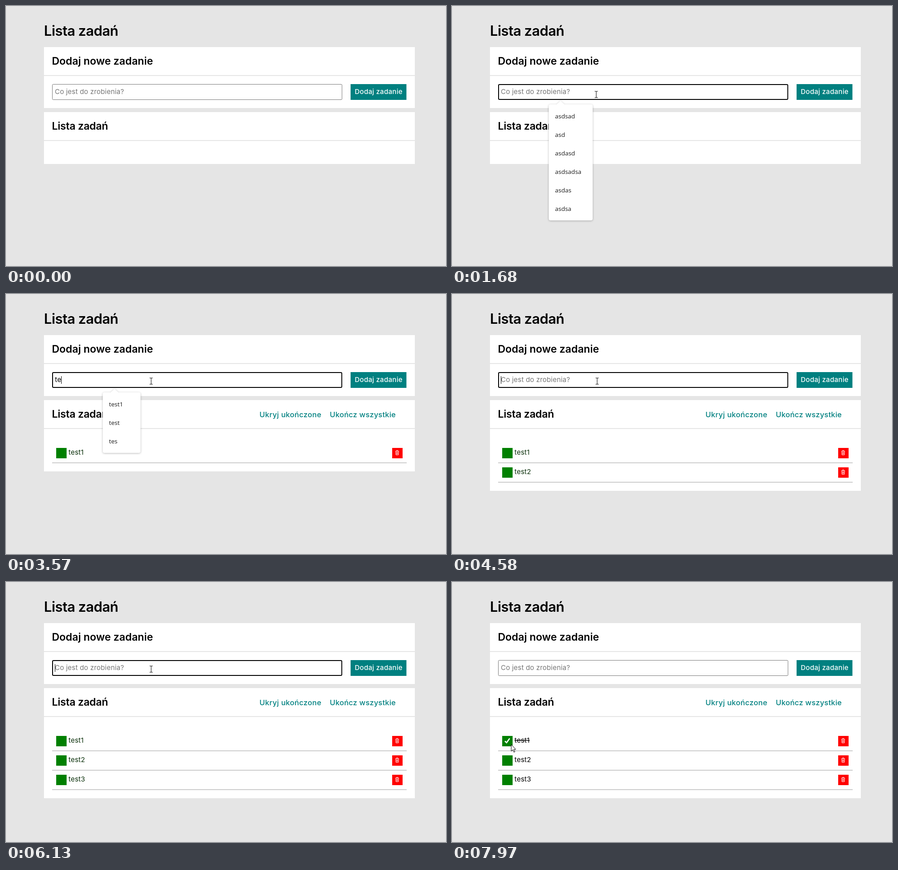
Recreate the animation shown at these times as an HTML page. Size 973 by 576 pixels, loop 8 s.

```html
<!DOCTYPE html>
<html lang="pl">
<head>
<meta charset="utf-8">
<title>Lista zadań</title>
<style>
  html, body { margin: 0; width: 100%; height: 100%; overflow: hidden; background: #e5e5e5; }
  svg { display: block; width: 100%; height: 100%; font: 15px Inter, sans-serif; letter-spacing: .2px; }
  .title { font-size: 30.8px; font-weight: 600; letter-spacing: -.5px; }
  .heading { font-size: 23px; font-weight: 600; letter-spacing: 0; }
  .heading.list { letter-spacing: -.25px; }
  .card { fill: #fff; }
  .rule { fill: #e5e5e5; }
  .mid { text-anchor: middle; font-weight: 500; }
  .button { fill: #fff; letter-spacing: .3px; }
  .link { fill: #008080; font-size: 16.5px; letter-spacing: .3px; }
  .hint { fill: #757575; }
  .popup { filter: drop-shadow(0 1px 2px #0004); }
  .popup text { font: 13.5px "Open Sans", sans-serif; letter-spacing: 0; fill: #1b1b1b; }
  .task text { fill: #0a300a; }
  .settled .task text { fill: #000; }
  .done text { text-decoration: line-through; }
  .check { display: none; fill: none; stroke: #fff; stroke-width: 2.6; }
  .done .check { display: inline; }
</style>
</head>
<body>
<svg viewBox="0 0 973 576">
  <text class="title" x="84" y="66">Lista zadań</text>

  <rect class="card" x="84" y="91" width="820" height="135"/>
  <rect class="rule" x="84" y="153" width="820" height="2"/>
  <text class="heading" x="101.5" y="130">Dodaj nowe zadanie</text>
  <rect id="field" fill="#fff"/>
  <text id="hint" class="hint" x="108" y="195">Co jest do zrobienia?</text>
  <text id="typed" x="108.3" y="195"></text>
  <rect id="caret" y="182" width="1" height="17"/>
  <rect x="762" y="173" width="123.5" height="35" fill="#008080"/>
  <text class="mid button" x="824" y="195">Dodaj zadanie</text>

  <rect id="listCard" class="card" x="84" y="235" width="820"/>
  <rect class="rule" x="84" y="297" width="820" height="2"/>
  <text class="heading list" x="101.5" y="274">Lista zadań</text>
  <g id="links">
    <text class="mid link" x="629" y="273">Ukryj ukończone</text>
    <text class="mid link" x="789" y="273" style="letter-spacing:.2px">Ukończ wszystkie</text>
  </g>
  <g id="tasks"></g>

  <g id="popup" class="popup">
    <path d="M231 218.5 L240 210 L249 218.5Z" fill="#fff"/>
    <rect id="popupBox" x="214" y="218" rx="4" fill="#fff"/>
    <g id="options"></g>
  </g>

  <g id="arrow">
    <path d="M.5 .5 V15.4 L3.9 12.2 L6.4 17.6 L8.6 16.6 L6.2 11.4 H10.6Z" fill="#fff" stroke="#000" stroke-linejoin="round"/>
  </g>
  <g id="beam" fill="none">
    <path id="beamShape" d="M-3.5 -7 H-1 L0 -6 L1 -7 H3.5 M-3.5 7 H-1 L0 6 L1 7 H3.5 M0 -6 V6" stroke="#111" stroke-width="1.1"/>
  </g>
</svg>

<script>
const LOOP = 8000, STEP = 70, ROW = 43, OPTION = 41;
const $ = id => document.getElementById(id);

const history = ['asdsad', 'asd', 'asdasd', 'asdsadsa', 'asdas', 'asdsa'];
const early = ['test', 'test1', 'tes'];
const recent = ['test1', 'test', 'tes'];
const others = ['trening', 'tablica'];

// Each entry changes part of the state from its time on.
const events = [
  [0, { text: '', caret: false, focus: false, options: [], fade: 1, tasks: 0, done: false, settled: false }],
  [1140, { focus: true, caret: true, options: history }],
  [1680, { caret: false }],
  [1750, { text: 't', caret: true }],
  [1820, { options: [...early, ...others] }],
  [1960, { text: 'te', options: early }],
  [2110, { text: 'tes' }],
  [2290, { text: 'test' }],
  [2360, { options: early.slice(0, 2) }],
  [2500, { text: 'test1' }],
  [2550, { fade: .45 }],
  [2620, { options: [] }],
  [2890, { text: '', tasks: 1 }],
  [3050, { caret: false }],
  [3430, { text: 't', caret: true }],
  [3500, { options: [...recent, ...others], fade: 1 }],
  [3570, { text: 'te', options: recent }],
  [3840, { text: 'tes' }],
  [4040, { text: 'test', options: recent.slice(0, 2) }],
  [4240, { text: 'test2' }],
  [4310, { fade: .45 }],
  [4380, { options: [] }],
  [4580, { text: '', tasks: 2 }],
  [4810, { caret: false }],
  [5050, { text: 't', caret: true }],
  [5120, { options: recent, fade: 1 }],
  [5190, { text: 'te' }],
  [5390, { text: 'tes' }],
  [5590, { text: 'test', options: recent.slice(0, 2) }],
  [5920, { text: 'test3' }],
  [5990, { fade: .45 }],
  [6060, { options: [] }],
  [6130, { text: '', tasks: 3 }],
  [6460, { caret: false }],
  [6990, { caret: true }],
  [7520, { caret: false }],
  [7830, { focus: false, settled: true }],
  [7900, { done: true }]
];

// Pointer stops: time, x, y.
const stops = [
  [380, 865, 532], [1140, 303, 203], [1210, 322, 192], [1280, 319, 196],
  [1750, 319, 196], [1820, 321, 193], [6720, 321, 193], [7200, 209.5, 279],
  [7550, 124, 361], [7620, 128, 360], [7690, 130.5, 359.5], [LOOP, 130.5, 359.5]
];

function pointerAt(time) {
  const t = 380 + Math.floor((time - 380) / STEP + .15) * STEP;
  const next = stops.findIndex(stop => stop[0] > t);
  const [t0, x0, y0] = stops[next - 1], [t1, x1, y1] = stops[next];
  let k = (t - t0) / (t1 - t0);
  if (t1 === 1140) k = k * k * (3 - 2 * k);
  return [x0 + (x1 - x0) * k, y0 + (y1 - y0) * k];
}

$('tasks').innerHTML = [1, 2, 3].map((n, i) => `
  <g class="task" transform="translate(0 ${i * ROW})">
    <rect x="111" y="341" width="23" height="23" fill="#008000"/>
    <path class="check" d="M117 352.5 L120.7 356 L127.5 346.5"/>
    <text x="138.3" y="356">test${n}</text>
    <rect x="854" y="341" width="23" height="23" fill="#f00"/>
    <path d="M861 348.2 H869 M863.5 347.8 V346.8 H866.5 V347.8 M861.8 349 L862.3 356.5 H867.7 L868.2 349 M864 350 V355 M866 350 V355"
      fill="none" stroke="#fff"/>
    <rect x="102" y="373" width="784" height="2" fill="#ccc"/>
  </g>`).join('');
const rows = [...document.querySelectorAll('.task')];

const show = (node, on) => { node.style.display = on ? '' : 'none'; };
function set(node, attrs) {
  for (const name in attrs) node.setAttribute(name, attrs[name]);
}

let shownOptions;
function drawPopup({ options, fade }) {
  show($('popup'), options.length);
  $('popup').style.opacity = fade;
  if (options === shownOptions) return;
  shownOptions = options;
  const wide = options === history || options.length === 5;
  set($('popupBox'), { width: wide ? 97 : 83.5, height: options.length * OPTION + 11 });
  $('options').innerHTML = options.map((label, i) =>
    `<text x="227.7" y="${249 + i * OPTION}">${label}</text>`).join('');
}

function drawField({ text, caret, focus }) {
  const inset = focus ? 1 : .5;
  set($('field'), {
    x: 102 + inset, y: 173 + inset, width: 641.5 - 2 * inset, height: 35 - 2 * inset,
    rx: 2, stroke: focus ? '#000' : '#767676', 'stroke-width': 2 * inset
  });
  show($('hint'), !text);
  $('typed').textContent = text;
  show($('caret'), caret);
  const end = text ? $('typed').getComputedTextLength() : 0;
  set($('caret'), { x: Math.round(108 + end) });
}

function drawPointer(time) {
  const visible = time >= 380;
  const [x, y] = visible ? pointerAt(time) : [0, 0];
  const overField = x > 102 && x < 743 && y > 173 && y < 208;
  show($('arrow'), visible && !overField);
  show($('beam'), visible && overField);
  set($('arrow'), { transform: `translate(${x} ${y})` });
  set($('beam'), { transform: `translate(${x} ${y})` });
}

function draw(time) {
  const state = Object.assign({}, ...events.filter(([at]) => at <= time).map(([, patch]) => patch));
  drawField(state);
  drawPopup(state);
  set($('listCard'), { height: 115 + state.tasks * ROW });
  show($('links'), state.tasks);
  rows.forEach((row, i) => show(row, i < state.tasks));
  rows[0].classList.toggle('done', state.done);
  $('tasks').classList.toggle('settled', state.settled);
  drawPointer(time);
}

const start = performance.now();
function tick(now) {
  draw(Math.max(0, now - start) % LOOP);
  requestAnimationFrame(tick);
}
draw(0);
requestAnimationFrame(tick);
</script>
</body>
</html>
```
